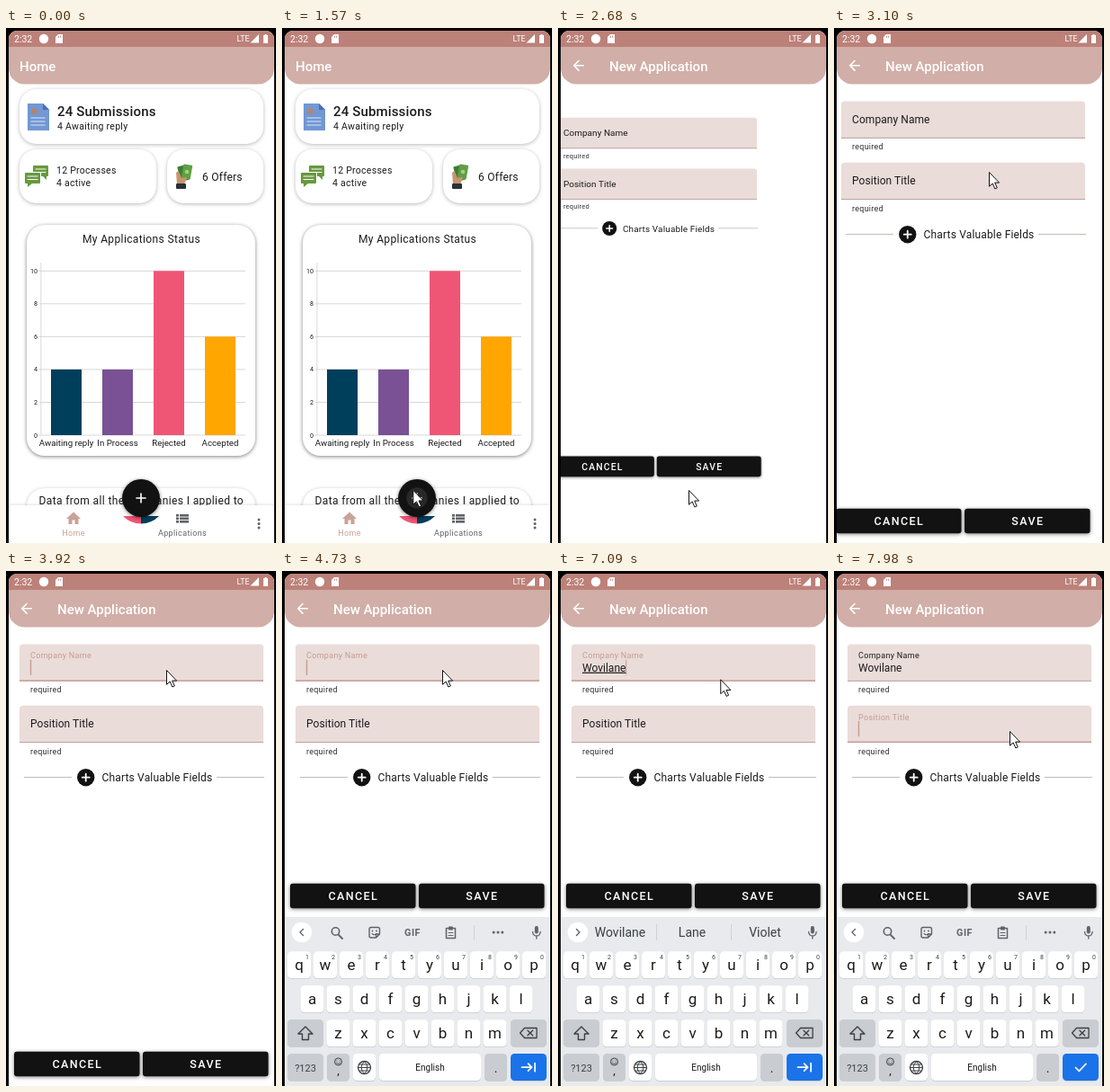
An HTML page that plays this animation: 300 px wide and 573 px high, repeating every 8 s.

```html
<!DOCTYPE html>
<html lang="en">
<head>
<meta charset="utf-8">
<title>Application tracker</title>
<style>
html, body { margin: 0; width: 100%; height: 100%; overflow: hidden; background: #000; }
svg { display: block; width: 100%; height: 100%; font-family: Roboto, "Open Sans", sans-serif; }
text { white-space: pre; }
.mid { text-anchor: middle; }
.end { text-anchor: end; }
.bold { font-weight: 500; }
.card { fill: #fff; filter: drop-shadow(0 1.5px 2px rgba(0,0,0,.28)); }
.lift { filter: drop-shadow(0 1.5px 2.2px rgba(0,0,0,.5)); }
.line { fill: none; stroke-linecap: round; stroke-linejoin: round; }
</style>
</head>
<body>
<svg id="stage" viewBox="0 0 300 573"></svg>
<script>
const LOOP = 8000;
const ROSE = '#c49c94', INK = '#1b1b1b', GREY = '#5f6368';
const NAME = 'Wovilane';
const FIELD_TOP = [81.4, 149.7], FIELD_H = 41.4;

// Markup helpers
const text = (x, y, str, size, color = INK, attrs = '') =>
  `<text x="${x}" y="${y}" font-size="${size}" fill="${color}" ${attrs}>${str}</text>`;
const rect = (x, y, w, h, fill, r = 0, attrs = '') =>
  `<rect x="${x}" y="${y}" width="${w}" height="${h}" rx="${r}" fill="${fill}" ${attrs}/>`;
const disc = (x, y, r, fill, attrs = '') =>
  `<circle cx="${x}" cy="${y}" r="${r}" fill="${fill}" ${attrs}/>`;
const path = (d, fill, attrs = '') => `<path d="${d}" fill="${fill}" ${attrs}/>`;
const line = (d, color, width = 1, attrs = '') =>
  `<path class="line" d="${d}" stroke="${color}" stroke-width="${width}" ${attrs}/>`;
const group = (id, body, attrs = '') => `<g id="${id}" ${attrs}>${body}</g>`;
const gap = n => `letter-spacing="${n}"`;
const mid = 'class="mid"';

function statusBar() {
  return rect(3, 3, 295, 18, '#bc8179') +
    text(9, 15.7, '2:32', 10.5, '#fff') + disc(42, 12, 5.2, '#fff') +
    path('M58 7h5v10h-8v-7z', '#fff') + line('M58.500 9v1.500M60.500 9v1.500', '#bc8179', .8) +
    text(256.5, 15.3, 'LTE', 9, '#fff') +
    path('M281 7v9.5h-9.5z', '#fff') + path('M286 8h1.5v-1h2v1h1.500v9h-5z', '#fff');
}

function header() {
  return path('M3 21H298V45a17.500 17.500 0 0 1-17.500 17.500H20.500a17.500 17.500 0 0 1-17.500-17.500z', '#d1aea7') +
    group('titleHome', text(15, 48, 'Home', 15, '#fff', 'class="bold"')) +
    group('titleForm', line('M28.300 41.800H17.800M23 36.500l-5.300 5.300 5.300 5.300', '#fff', 1.6) +
      text(57, 48, 'New Application', 15, '#fff', 'class="bold"'));
}

function summaryIcons() {
  const bubble = (x, y) => rect(x, y, 17, 12, '#67993d', 1) +
    line(`M${x + 3} ${y + 4}h11M${x + 3} ${y + 7.5}h11`, '#fff', 1);
  const doc = path('M24 84h17l7 7v23H24z', '#7297d3') + path('M41 84l7 7h-7z', '#4a6fb0') +
    disc(31.5, 92.5, 3.2, '#b98368') +
    line('M28 100h15M28 104h15M28 108h15', '#dce7fa', 1.2);
  const chat = bubble(30, 153) + path('M41 165h4v4z', '#67993d') +
    rect(20, 160, 19, 14, '#fff') + bubble(21, 161) + path('M24 173h5l-5 4z', '#67993d');
  const cash = rect(192, 153, 10, 17, '#3e7d32', 1, 'transform="rotate(-14 197 161)"') +
    rect(196, 152, 10, 16, '#5f9f43', 1, 'transform="rotate(10 201 160)"') + disc(201, 160, 2.3, '#a4cc86') +
    path('M189 161q3-3 4 1l2 5 5-1q2 1 0 3l-2 5h-8z', '#c9946f') + rect(189, 173, 11, 6, '#263238', 1);
  return doc + chat + cash;
}

function chart() {
  const zero = 453, unit = 18.27;
  let out = text(150.500, 238.5, 'My Applications Status', 12, INK, mid + gap(.38));
  for (let v = 0; v <= 10; v += 2) {
    const y = zero - v * unit;
    out += rect(37, y - .4, 229, .8, '#cfcfcf') + text(35, y + 2.500, v, 7.2, INK, 'class="end"');
  }
  out += rect(38.500, 261, .8, 192, '#cfcfcf');
  [['Awaiting reply', 4, '#003f5c'], ['In Process', 4, '#7a5195'],
   ['Rejected', 10, '#ef5675'], ['Accepted', 6, '#ffa600']].forEach(([label, v, color], i) => {
    const x = 50 + 57 * i;
    out += rect(x, zero - v * unit, 34, v * unit, color) + text(x + 17, 465.3, label, 9.7, INK, mid);
  });
  return out;
}

function home() {
  return rect(15, 68, 271, 61, '', 19, 'class="card"') + rect(15, 135, 152, 60, '', 19, 'class="card"') +
    rect(179, 135, 107, 60, '', 19, 'class="card"') +
    summaryIcons() +
    text(57, 97.5, '24 Submissions', 15, INK, 'class="bold"' + gap(.15)) +
    text(57, 113, '4 Awaiting reply', 10.5, INK, gap(.27)) +
    text(56, 162, '12 Processes', 10.5, INK, gap(.27)) +
    text(56, 176.3, '4 active', 10.5, INK, gap(.27)) +
    text(218, 170.3, '6 Offers', 12, INK, gap(.25)) +
    rect(23, 219, 254, 257, '', 20, 'class="card lift"') + chart() +
    rect(23, 512, 254, 100, '', 20, 'class="card"') +
    text(36.500, 530, 'Data from all the companies I applied to', 12, INK, gap(.38));
}

function nav() {
  let dots = '';
  for (const y of [547, 551.5, 556]) dots += disc(281, y, 1.5, GREY);
  let list = '';
  for (const y of [541, 544.5, 548]) list += rect(189, y, 3, 2.6, GREY) + rect(193, y, 10, 2.6, GREY);
  return rect(3, 531, 295, 42, '#fff', 0, 'class="card"') +
    path('M150 543V551.500A28 28 0 0 1 130 543z', '#ef5675') +
    path('M150 543V551.500A28 28 0 0 0 170 543z', '#003f5c') +
    disc(150, 523, 21, '#121212', 'class="lift"') + disc(150, 523, 0, '#fff', 'id="ripple"') +
    line('M145 523h10M150 518v10', '#fff', 1.6) +
    path('M75 538.500l8 7.500h-2.500v6h-4v-4.500h-3v4.500h-4v-6H67z', '#c9a298') +
    text(75, 565.3, 'Home', 9, '#c9a298', mid + gap(.36)) +
    list + text(196, 565.3, 'Applications', 9, GREY, mid + gap(.36)) + dots;
}

function field(n, label) {
  const y = FIELD_TOP[n - 1];
  return path(`M15 ${y + FIELD_H}V${y + 4}q0-4 4-4H282q4 0 4 4V${y + FIELD_H}z`, '#eadcd9') +
    rect(15, y, 271, 1, '', 0, `id="under${n}"`) +
    text(27, y, label, 12, INK, `id="label${n}"`) +
    rect(26.800, y + 17.300, 1.400, 17, ROSE, 0, `id="caret${n}"`) +
    text(27, y + 53.900, 'required', 9, '#333', gap(.25));
}

function form() {
  const button = (x, label) => rect(x, 534.700, 139.500, 27.500, '#121212', 3, 'class="lift"') +
    text(x + 70.3, 553, label, 12.5, '#fff', 'class="mid bold"' + gap(1.4));
  return field(1, 'Company Name') + text(27, 111.7, '', 12, INK, 'id="value"') +
    field(2, 'Position Title') +
    rect(20, 229, 53, 1, '#c3bbb9') + rect(234, 229, 53, 1, '#c3bbb9') +
    disc(88.700, 229.700, 9.7, '#121212') + line('M84.700 229.700h8M88.700 225.700v8', '#fff', 1.8) +
    text(106.500, 234.2, 'Charts Valuable Fields', 12, INK, gap(.17)) +
    group('buttons', button(9, 'CANCEL') + button(152, 'SAVE'));
}

function strip() {
  const tools = line('M63 405l4 4', GREY, 1.8) + disc(59.500, 401, 4.2, 'none', `stroke="${GREY}" stroke-width="1.6"`) +
    line('M99 396.500h7.500q2 0 2 2v5.500l-4 4H99q-2 0-2-2v-7.500q0-2 2-2zM108.500 404h-4v4', GREY, 1.4) +
    line('M100 403.500q2.500 2.500 5 0', GREY, 1.1) +
    disc(100.500, 400.500, .9, GREY) + disc(105, 400.500, .9, GREY) +
    text(145, 405.800, 'GIF', 10.8, GREY, 'class="mid" font-weight="700"' + gap(.5)) +
    line('M182.500 397.500h10v11h-10z', GREY, 1.5) + rect(185, 395.500, 5, 4, GREY, 1) +
    line('M185 402.500h5M185 405.500h5', GREY, 1.1) +
    rect(213, 394, 1, 17, '#cfd2d6') + [235.2, 240, 244.8].map(x => disc(x, 402, 1.5, GREY)).join('');
  const words = [69, 149, 230].map((x, i) => text(x, 407, '', 14, '#3c4043', `id="hint${i}" ${mid}`)).join('') +
    rect(109, 393, 1, 18, '#cfd2d6') + rect(192, 393, 1, 18, '#cfd2d6');
  return disc(22, 402, 11.3, '#fff') + line('', GREY, 1.4, 'id="chevron"') +
    group('tools', tools) + group('words', words) +
    rect(280.800, 395, 4, 8.500, GREY, 2) + line('M278.500 401.500q.5 4.500 4.300 4.500t4.300-4.500M282.800 406v3', GREY, 1.3);
}

function keyboard() {
  const key = (x, y, w, fill = '#fff') =>
    rect(x, y + .8, w, 30, '#c3c6ca', 4.500) + rect(x, y, w, 30, fill, 4.500);
  const DIM = '#c9ccd1';
  let keys = '', letters = '';
  [['qwertyuiop', 19], ['asdfghjkl', 33.5], ['zxcvbnm', 62.5]].forEach(([row, x0], r) => {
    [...row].forEach((ch, i) => {
      const x = x0 + 29 * i, y = 423.3 + 38 * r;
      keys += key(x - 13, y, 26);
      letters += text(x, y + 20.7, ch, 17, INK, mid);
      if (!r) keys += text(x + 9, y + 8.2, (i + 1) % 10, 7, '#3c4043', mid);
    });
  });
  const shift = 'M26 507l8 8h-4.500v6.500h-7V515H18z';
  return rect(3, 385, 295, 188, '#e8eaed') + strip() + keys + group('letters', letters) +
    key(6, 499, 40, DIM) + path(shift, 'none', `id="shift" stroke="#3c4043" stroke-width="1.4" stroke-linejoin="round"`) +
    key(254, 499, 40, DIM) + line('M269.500 508.500h13.500v11h-13.500l-5-5.500zM273 511.200l5.600 5.600M278.600 511.200l-5.600 5.600', '#3c4043', 1.3) +
    key(6, 537, 40, DIM) + text(26, 556.6, '?123', 11, '#3c4043', mid) +
    key(50, 537, 25, DIM) + disc(62.500, 546, 4, 'none', 'stroke="#3c4043"') + line('M60.500 547.500q2 2 4 0M61 545v.1M64 545v.1', '#3c4043', .9) +
    text(62.500, 560, ',', 13, INK, mid) +
    key(79, 537, 25) + disc(91.500, 552.500, 7, 'none', 'stroke="#3c4043" stroke-width="1.3"') +
    line('M84.500 552.500h14M86 549h11M86 556h11M91.500 545.500q-7 7 0 14q7-7 0-14', '#3c4043', 1) +
    key(108, 537, 113) + text(164.500, 556.300, 'English', 10, INK, mid) +
    key(225, 537, 25, DIM) + text(237.500, 558, '.', 14, INK, mid) +
    key(254, 537, 40, '#1a73e8') + line('', '#fff', 1.7, 'id="action"');
}

const stage = document.getElementById('stage');
stage.innerHTML =
  `<clipPath id="screen"><path d="M3 573V12a9 9 0 0 1 9-9H289a9 9 0 0 1 9 9V573z"/></clipPath>
  <g clip-path="url(#screen)">${rect(3, 3, 295, 570, '#fff')}` +
  group('home', home()) + group('nav', nav()) + group('form', form()) + group('keyboard', keyboard()) +
  header() + statusBar() + '</g>' +
  group('pointer', path('M.5 .5V16.300l3.700-3.300 2.700 6 2.400-1.100-2.600-5.800h4.900z', '#fff', 'stroke="#111" stroke-linejoin="round"'));

const el = {};
stage.querySelectorAll('[id]').forEach(e => el[e.id] = e);

// Timing
const POINTER = [[330, 237, 575], [620, 189, 491], [1020, 189, 491], [1600, 145, 514],
  [2680, 145, 514], [3060, 172, 160], [3440, 172, 160], [3700, 178, 110],
  [7020, 178, 110], [7350, 197, 197], [7620, 195, 178]];
const ENTER = [[1840, -300, .02], [2320, -107.4, .462], [2680, -42, .83], [2880, -20, 1], [3100, -7, 1], [3240, 0, 1]];
const LEAVE = [[1840, 0, 1], [2260, 300, .02]];
const TYPED = [5080, 5350, 5550, 5740, 6010, 6280, 6420, 6480];
const HINTS = [[5080, 'W', 'We', 'What'], [5350, 'Wo', 'Would', 'Work'], [5550, 'Wov', 'Woven', 'Wove'],
  [5740, 'Wovi', NAME, 'Woven'], [6010, 'Wovil', NAME, 'Woven'], [6280, 'Wovila', NAME, 'Violin'],
  [6420, 'Wovilan', NAME, 'Violet'], [6680, NAME, 'Lane', 'Violet']];

const clamp = v => Math.min(1, Math.max(0, v));
const span = (t, a, b) => clamp((t - a) / (b - a));
const smooth = p => p * p * (3 - 2 * p);
const mix = (a, b, p) => a + (b - a) * p;

function track(t, keys, ease = p => p) {
  const next = keys.findIndex(k => k[0] > t);
  if (next === 0) return keys[0].slice(1);
  if (next < 0) return keys[keys.length - 1].slice(1);
  const a = keys[next - 1], b = keys[next], p = ease(span(t, a[0], b[0]));
  return a.slice(1).map((v, i) => mix(v, b[i + 1], p));
}

const set = (e, attrs) => { for (const k in attrs) e.setAttribute(k, attrs[k]); };
const show = (e, on) => { e.style.display = on ? '' : 'none'; };
const zoom = (e, [x, s]) => set(e, { transform: `translate(${x + 150} 190) scale(${s}) translate(-150 -190)` });

function drawField(n, focused, rise) {
  const top = FIELD_TOP[n - 1], height = focused ? 1.5 : 1;
  set(el['label' + n], {
    y: top + mix(24.1, 15.8, rise), 'font-size': mix(12, 9, rise),
    'letter-spacing': mix(.06, .32, rise), fill: focused && rise ? ROSE : INK
  });
  set(el['under' + n], { y: top + FIELD_H - height, height, fill: focused ? ROSE : '#b5a09c' });
}

function draw(t) {
  const onForm = t >= 1840, second = t >= 7690, first = t >= 3700 && !second;
  show(el.home, t < 2260);
  show(el.nav, !onForm);
  show(el.titleHome, !onForm);
  show(el.titleForm, onForm);
  show(el.form, onForm);
  zoom(el.home, track(t, LEAVE));
  zoom(el.form, track(t, ENTER));
  const tap = span(t, 1460, 1640);
  set(el.ripple, { r: 19 * tap, opacity: .25 * (1 - tap) });

  drawField(1, first, smooth(span(t, 3700, 3850)));
  drawField(2, second, smooth(span(t, 7890, 7975)));

  const count = TYPED.filter(at => t >= at).length;
  el.value.textContent = NAME.slice(0, count);
  set(el.value, { 'text-decoration': second ? 'none' : 'underline' });
  show(el.caret1, first && !(t >= 4200 && t < 4730));
  set(el.caret1, { x: 26.8 + (count ? el.value.getComputedTextLength() : 0), width: count ? 1 : 1.4 });
  show(el.caret2, t >= 7910);

  const up = span(t, 3985, 4190);
  show(el.keyboard, up > 0);
  set(el.keyboard, { transform: `translate(0 ${188 * (1 - up) ** 2})` });
  set(el.buttons, { transform: `translate(0 ${t >= 4060 ? -187 : 0})` });

  const caps = t >= 4880 && t < 5150;
  el.letters.style.textTransform = caps ? 'uppercase' : 'none';
  set(el.shift, { fill: caps ? '#3c4043' : 'none' });
  const hint = t < 7910 && HINTS.filter(h => t >= h[0]).pop();
  show(el.words, hint);
  show(el.tools, !hint);
  if (hint) for (let i = 0; i < 3; i++) el['hint' + i].textContent = hint[i + 1];
  set(el.chevron, { d: hint ? 'M20.500 398.500l3.500 3.500-3.500 3.500' : 'M23.500 398.500l-3.500 3.500 3.500 3.500' });
  set(el.action, { d: t >= 7910 ? 'M268.500 552.500l3.800 3.800 7.700-8' : 'M266.500 552.200h11M273.500 548.200l4 4-4 4M281 547.700v9' });

  set(el.pointer, { transform: `translate(${track(t, POINTER, smooth)})` });
}

const start = performance.now();
function tick() {
  draw((performance.now() - start) % LOOP);
  requestAnimationFrame(tick);
}
tick();
</script>
</body>
</html>
```
